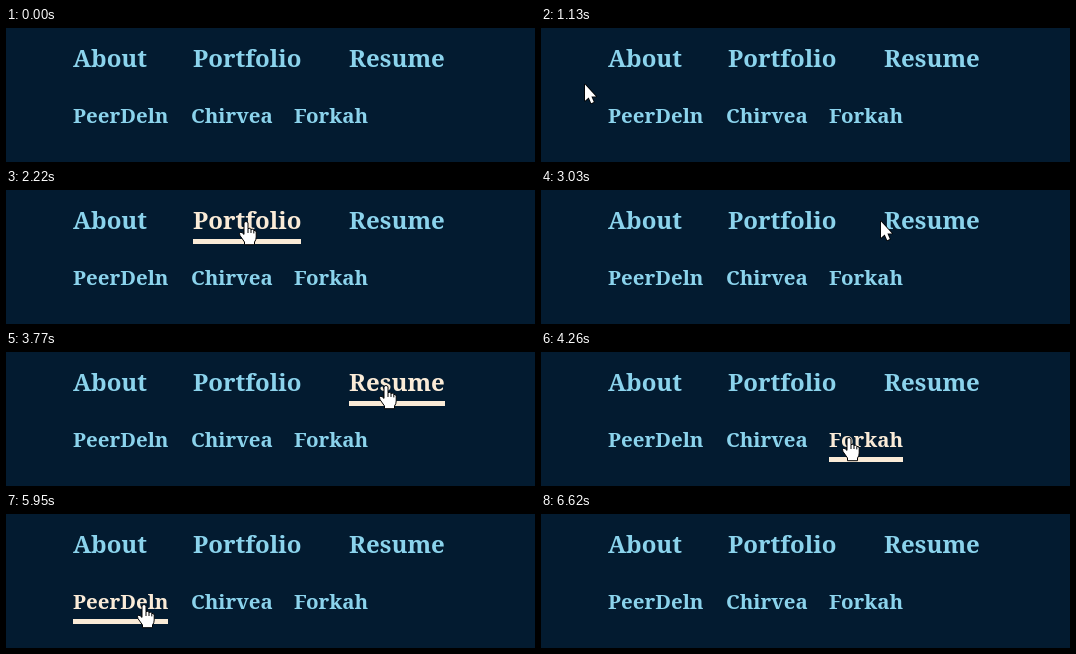
These frames come from a looping animation (529 by 134 pixels, 7.48 s). An HTML page:

```html
<!DOCTYPE html>
<html lang="en">
<head>
<meta charset="utf-8">
<title>Link hover</title>
<style>
  html, body { margin: 0; width: 100%; height: 100%; overflow: hidden; background: #031b30; }
  svg { display: block; width: 529px; height: 134px; }
  text { font: 700 24px "Noto Serif", serif; }
  .small text { font-size: 20.5px; }
  .link { fill: #8bd3ec; }
  .link rect { visibility: hidden; }
  .link.on { fill: #faebd7; }
  .link.on rect { visibility: visible; }
  #cursor path { fill: #fff; stroke: #000; stroke-linejoin: round; }
  #arrow { stroke-width: 1.6; paint-order: stroke; }
</style>
</head>
<body>
<svg viewBox="0 0 529 134">
  <g id="links"></g>
  <g id="cursor">
    <path id="arrow" d="M1 .5V16.8L4.7 13.4 7.2 19.2 9.8 18.1 7.4 12.5H12Z"/>
    <path id="hand" d="M-2 1.6Q0 -.8 2 1.6V7.6Q4.2 6.6 5 8.4Q7 7.5 7.8 9.4Q10.2 8.9 10.2 11.4V16Q10.2 19 8.5 21V23.7H-1.5V21L-6 14.6Q-7.3 12 -5.4 11.4Q-4 11 -2 13.4ZM2 7.6V12M5 8.4V12M7.8 9.4V12.4"/>
  </g>
</svg>
<script>
const LOOP = 7480, STEP = 70, SHOW = 990, HIDE = 6620;
const START = [-15, 69];

// label, x, width, baseline, underline top
const LINKS = [
  ["About", 67, 72, 39, 49],
  ["Portfolio", 187, 108, 39, 49],
  ["Resume", 343, 96, 39, 49],
  ["PeerDeln", 67, 95, 95, 105],
  ["Chirvea", 185, 81, 95, 105],
  ["Forkah", 288, 74, 95, 105]
];

// start time, steps, destination x, y
const MOVES = [
  [990, 6, 100, 42],
  [1940, 1, 119, 43],
  [2010, 4, 240, 31],
  [2750, 7, 379, 31],
  [3500, 2, 381, 32],
  [3770, 1, 380, 33],
  [3840, 7, 308, 85],
  [4860, 5, 231, 89],
  [5740, 5, 115, 90],
  [6550, 1, 113, 96]
];

const byId = id => document.getElementById(id);

function add(parent, name, attrs) {
  const el = document.createElementNS("http://www.w3.org/2000/svg", name);
  for (const key in attrs) el.setAttribute(key, attrs[key]);
  return parent.appendChild(el);
}

const rows = [add(byId("links"), "g", {}), add(byId("links"), "g", { class: "small" })];
const links = LINKS.map(([label, x, width, base, line], i) => {
  const el = add(rows[i < 3 ? 0 : 1], "g", { class: "link" });
  add(el, "text", { x, y: base }).textContent = label;
  add(el, "rect", { x, y: line, width, height: 5 });
  return { el, x, right: x + width, top: base - 23, bottom: line + 5 };
});

function pointer(t) {
  let [x, y] = START;
  for (const [start, steps, toX, toY] of MOVES) {
    if (t < start) break;
    const p = Math.min(1, (Math.floor((t - start) / STEP) + 1) / steps);
    x += (toX - x) * p;
    y += (toY - y) * p;
  }
  return [Math.round(x), Math.round(y)];
}

function draw(t) {
  const shown = t >= SHOW && t < HIDE;
  const [x, y] = pointer(t);
  let over = false;
  for (const l of links) {
    const on = shown && x >= l.x && x < l.right && y >= l.top && y < l.bottom;
    l.el.classList.toggle("on", on);
    over = over || on;
  }
  byId("cursor").setAttribute("transform", `translate(${x} ${y})`);
  byId("cursor").style.display = shown ? "" : "none";
  byId("hand").style.display = over ? "" : "none";
  byId("arrow").style.display = over ? "none" : "";
}

const begin = performance.now();
function tick() {
  draw((performance.now() - begin) % LOOP);
  requestAnimationFrame(tick);
}
tick();
</script>
</body>
</html>
```
